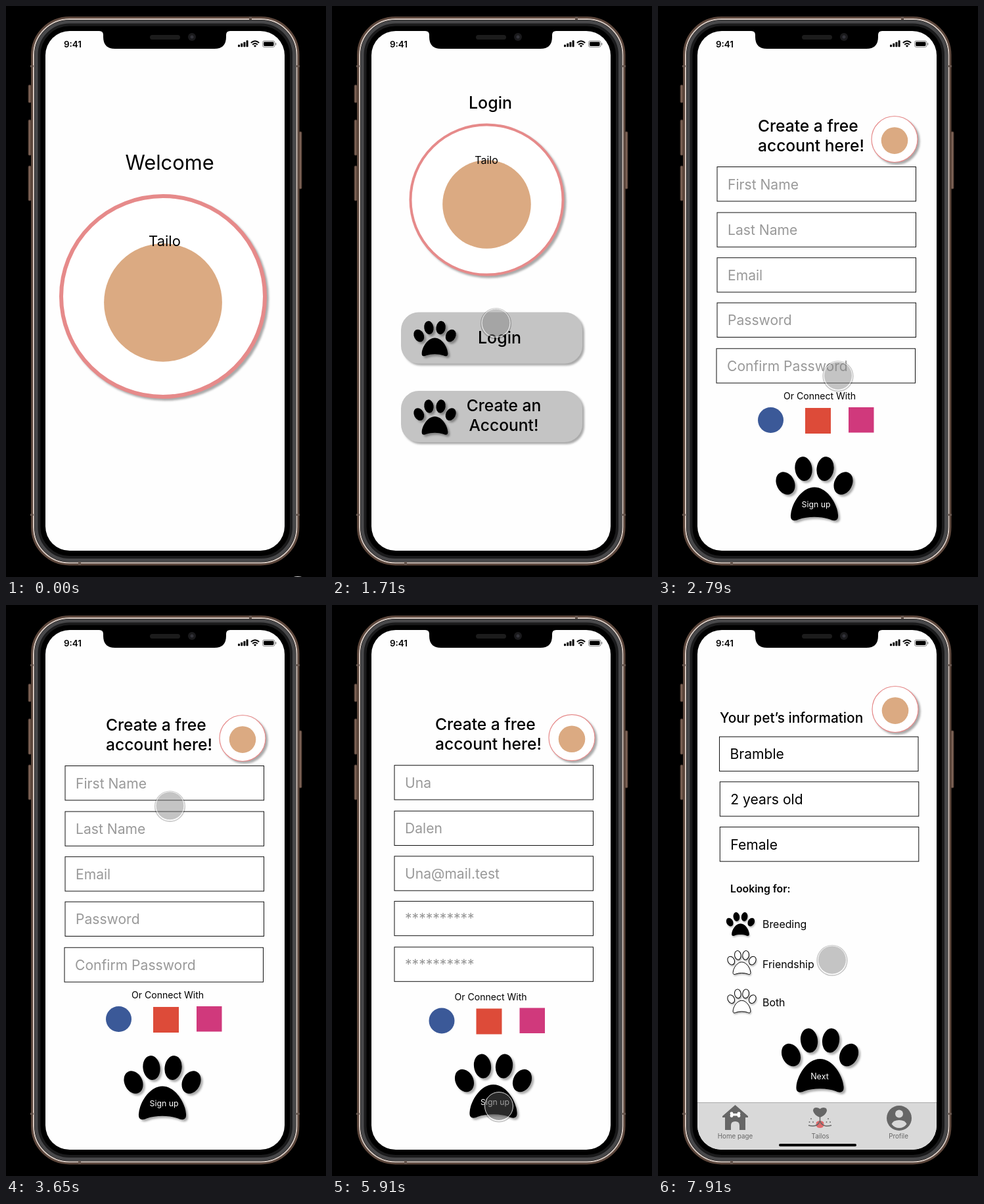
An HTML page for the animation above (7990 ms loop, 487 by 868 pixels).

```html
<!DOCTYPE html>
<html lang="en">
<head>
<meta charset="utf-8">
<title>Pet app prototype</title>
<style>
  html, body { margin: 0; width: 100%; height: 100%; overflow: hidden; background: #000; }
  svg { display: block; width: 100%; height: 100%; font-family: Inter, sans-serif; }
  .shadow { filter: drop-shadow(3.5px 3.5px 1.8px #0005); }
  .soft { filter: drop-shadow(1px 2px 1px #0004); }
</style>
</head>
<body>
<svg id="stage" viewBox="0 0 487 868"></svg>
<script>
const LOOP = 7990;
const stage = document.getElementById('stage');

const text = (x, y, size, str, opts = '') =>
  `<text x="${x}" y="${y}" font-size="${size}" ${opts}>${str}</text>`;
const rect = (x, y, w, h, opts = '') =>
  `<rect x="${x}" y="${y}" width="${w}" height="${h}" ${opts}/>`;
const shift = (x, y, content) => `<g transform="translate(${x} ${y})">${content}</g>`;
const medium = 'font-weight="500"';
const middle = 'text-anchor="middle"';

function paw(x, y, scale, opts = 'class="shadow"') {
  const toe = (cx, cy, rx, ry, angle) =>
    `<ellipse rx="${rx}" ry="${ry}" transform="translate(${cx} ${cy}) rotate(${angle})"/>`;
  return `<g ${opts}><g transform="translate(${x} ${y}) scale(${scale})">
    ${toe(-44, -8, 13.5, 18, -27)}${toe(-16.5, -30, 13, 18.5, -8)}
    ${toe(16.5, -30, 13, 18.5, 8)}${toe(44, -8, 13.5, 18, 27)}
    <path d="M0-2C20-2 35 24 36 40C37 50 30 50 24 47C10 42-10 42-24 47C-30 50-37 50-36 40C-35 24-20-2 0-2Z"/>
  </g></g>`;
}

function badge(x, y, rx, ry, line) {
  return `<ellipse class="shadow" cx="${x}" cy="${y}" rx="${rx}" ry="${ry}" fill="#fff" stroke="#e68a8a" stroke-width="${line}"/>
    <circle cx="${x}" cy="${y + rx * 0.06}" r="${rx * 0.58}" fill="#dbaa82"/>`;
}

const field = (x, y, label, color) =>
  rect(x, y, 302.5, 52.3, 'fill="#fff" stroke="#111"') +
  text(x + 16, y + 34, 21.1, label, `fill="${color}"`);

function welcomePage() {
  return text(249, 249, 30.8, 'Welcome', middle) +
    badge(239, 441.5, 155, 152.5, 6) +
    text(241.5, 365, 22, 'Tailo', middle);
}

function loginPage() {
  const button = y => rect(105, y, 276, 78, 'rx="27" fill="#c4c4c4" class="shadow"') + paw(156.5, y + 40, 0.55);
  const hint = 'fill="#00a0e1" fill-opacity=".17" stroke="#5ac8f0" stroke-opacity=".6"';
  return text(241, 156, 25, 'Login', `${middle} ${medium}`) +
    badge(235.5, 294.5, 116, 114, 4) +
    text(235, 240, 16, 'Tailo', middle) +
    button(465.5) + button(585) +
    text(255, 513, 25, 'Login', `${middle} ${medium}`) +
    text(261.5, 616, 24.6, 'Create an', `${middle} ${medium}`) +
    text(261.5, 646, 24.6, 'Account!', `${middle} ${medium}`) +
    `<g id="hint">${rect(104.5, 586, 275, 76.5, hint)}${rect(187, 594, 149.5, 53, hint)}</g>`;
}

function formPage(labels, body, last, social, pawShift) {
  const fields = labels.map((label, i) =>
    field(90 + (i === 4 ? last : 0), [244.5, 314, 382.7, 451.2, 520.8][i], label, '#999')).join('');
  return shift(...body,
      text(152, 191, 24.6, 'Create a free', medium) +
      text(152, 221, 24.6, 'account here!', medium) +
      badge(360, 202.5, 35, 35, 1.2) + fields) +
    shift(...social,
      text(191, 598, 14.06, 'Or Connect With') +
      '<circle cx="171.5" cy="629.5" r="19.5" fill="#3b5998"/>' +
      rect(224, 611, 39, 39, 'fill="#dd4b39"') +
      rect(290, 610, 38.5, 38.5, 'fill="#d0397c"')) +
    shift(...pawShift,
      paw(238, 733.5, 1) + text(240.5, 762, 12.3, 'Sign up', `${middle} fill="#fff"`));
}

function tabBar() {
  const label = (x, str) => text(x, 809, 9.8, str, `${middle} fill="#666"`);
  const dots = [[230, 779], [227.5, 784], [233, 784], [256, 779], [253.5, 784], [259, 784]]
    .map(([x, y]) => `<circle cx="${x}" cy="${y}" r=".9"/>`).join('');
  return rect(50, 754.5, 390, 80, 'fill="#d9d9d9" stroke="#aaa"') +
    `<g fill="#666">
      <path d="M114.5 758L134 775V777H130V796H121V789Q121 783 114.5 783Q108 783 108 789V796H99V777H95V775Z"/>
      <g fill="#fff"><rect x="109" y="771" width="11" height="3.5"/>
        <circle cx="109" cy="771" r="2.4"/><circle cx="109" cy="774.5" r="2.4"/>
        <circle cx="120" cy="771" r="2.4"/><circle cx="120" cy="774.5" r="2.4"/></g>
      <path d="M238 784Q243.5 780 249 784Q251 793 243.5 793Q236 793 238 784Z" fill="#e0696b"/>
      <path d="M233 767Q233 762 238 762Q241 762 243.5 764Q246 762 249 762Q254 762 254 767Q252 774 243.5 777Q235 774 233 767Z"/>
      <path d="M243.5 776V782M226 789Q240 793 243.5 782Q247 793 261 789" fill="none" stroke="#666" stroke-width="1.5"/>
      ${dots}
      <circle cx="364" cy="778" r="19"/>
      <g fill="#d9d9d9"><circle cx="364" cy="771.5" r="6"/><path d="M352.5 787Q355 781 364 781Q373 781 375.5 787Q371 793 364 793Q357 793 352.5 787Z"/></g>
    </g>` +
    label(114.5, 'Home page') + label(244, 'Tailos') + label(363, 'Profile') +
    rect(181, 817, 118, 4, 'rx="2"');
}

function petPage(labels, color, chosen, badgeX, titleY, pawX, tabShift) {
  const options = [['Breeding', 125.5, 485, 491], ['Friendship', 127.5, 543.5, 551.5], ['Both', 127.5, 602, 610]];
  const outline = 'class="soft" fill="#fff" stroke="#000" stroke-width="2.7"';
  return text(94, titleY, 20.8, 'Your pet’s information', medium) +
    badge(badgeX, 158.5, 35, 35, 1.2) +
    labels.map((label, i) => field(i ? 94.3 : 93.5, [200.3, 268.8, 337.5][i], label, color)).join('') +
    text(110, 437, 15.8, 'Looking for:', 'font-weight="600"') +
    options.map(([name, x, y, base], i) =>
      paw(x, y, 0.37, i === chosen ? 'class="soft"' : outline) + text(159, base, 15.9, name)).join('') +
    paw(pawX, 692, 1) + text(pawX - 0.5, 721, 12.5, 'Next', `${middle} fill="#fff"`) +
    shift(...tabShift, tabBar());
}

function phoneBody() {
  const ring = (inset, color, width) =>
    rect(38.5 + inset, 16.5 + inset, 407.5 - 2 * inset, 833.5 - 2 * inset,
      `rx="${58 - inset}" fill="#000" stroke="${color}" stroke-width="${width}"`);
  const side = (x, y, h) => rect(x, y, 4, h, 'rx="1.5" fill="#7d6255" stroke="#3d2e27"');
  return side(34, 120, 27) + side(34, 173, 54) + side(34, 243, 53) + side(446, 191, 87) +
    ring(1, '#5d473c', 3) + ring(3.5, '#d6c8c0', 2) + ring(8, '#48484a', 6) + ring(12, '#1b1b1c', 4) +
    [[370, 16, 4, 5], [110, 845, 4, 5], [37, 90, 5, 3], [442, 90, 5, 3], [37, 772, 5, 3], [442, 772, 5, 3]]
      .map(band => rect(...band, 'fill="#66564e"')).join('');
}

function statusBar() {
  const bars = [3.5, 5.5, 7.5, 10].map((h, i) => rect(353 + i * 4.2, 62.3 - h, 3, h, 'rx=".8"')).join('');
  return `<path d="M142 37V38Q148 38 148 44V47Q148 65 166 65H317Q335 65 335 47V44Q335 38 341 38V37Z"/>` +
    rect(219, 44, 46, 7, 'rx="3.5" fill="#1c1c1c"') +
    '<circle cx="283" cy="47" r="6" fill="#1a1a1c"/><circle cx="283" cy="47" r="2.5" fill="#33333a"/>' +
    text(101.5, 62.5, 13.4, '9:41', `${middle} font-weight="600"`) + bars +
    `<path d="M372.8 56Q379 50.3 385.2 56M375.2 58.8Q379 55.3 382.8 58.8" fill="none" stroke="#000" stroke-width="1.9"/>
     <path d="M376.8 60.4Q379 58.6 381.2 60.4L379 62.8Z"/>` +
    rect(390.5, 53, 18.5, 9.5, 'rx="2.6" fill="none" stroke="#888"') +
    rect(392, 54.5, 15.5, 6.5, 'rx="1.4"') + rect(410, 56, 1.3, 3.6, 'rx=".6" fill="#888"');
}

// [content, dissolve start, dissolve length]
const pages = [
  [welcomePage(), -1, 1],
  [loginPage(), 620, 420],
  [formPage(['First Name', 'Last Name', 'Email', 'Password', 'Confirm Password'], [0, 0], -1, [0, 0], [0, 0]), 2480, 310],
  [formPage(['Una', 'Dalen', 'Una@mail.test', '**********', '**********'], [5, -0.8], 0, [-4.5, 2.5], [7.5, -2.5]), 3770, 350],
  [petPage(['Pet Name', 'Age', 'Gender'], '#999', -1, 360, 178, 241.5, [0, 0]), 5960, 1],
  [petPage(['Bramble', '2 years old', 'Female'], '#000', 0, 361, 179, 246.5, [3, 2]), 7100, 190],
];

// [start, end, x, y, sideways bend]
const moves = [
  [30, 470, 248, 477, 0],
  [1590, 2420, 274, 562, 0],
  [3300, 3750, 246, 269, 0],
  [4630, 5470, 278, 757, 0],
  [5500, 5760, 254, 762, 0],
  [6250, 7070, 247, 225, 66],
  [7470, 7920, 265, 540, 0],
];
const presses = [[600, 1080], [5720, 6140]];

stage.innerHTML = `<clipPath id="screen">${rect(60, 38, 364, 790, 'rx="37"')}</clipPath>` +
  phoneBody() +
  `<g clip-path="url(#screen)">${pages.map(([content]) =>
    `<g class="page">${rect(59, 37, 366, 792, 'fill="#fefefe"')}${content}</g>`).join('')}</g>` +
  statusBar() +
  `<g id="cursor"><circle r="22.8" cy=".8" fill="none" stroke="#000" stroke-opacity=".22" stroke-width="1.6"/>
    <circle id="dot" r="21.5" stroke="#fff" stroke-opacity=".85"/></g>`;

const pageNodes = stage.querySelectorAll('.page');
const [hint, cursor, dot] = ['hint', 'cursor', 'dot'].map(id => document.getElementById(id));

function smooth(k) {
  k = Math.min(1, Math.max(0, k));
  return k * k * (3 - 2 * k);
}

function draw(t) {
  pages.forEach(([, start, length], i) => {
    const alpha = smooth((t - start) / length);
    pageNodes[i].setAttribute('opacity', alpha);
    const covered = pages[i + 1] && t >= pages[i + 1][1] + pages[i + 1][2];
    pageNodes[i].style.display = alpha && !covered ? '' : 'none';
  });
  hint.style.display = t >= 2330 ? '' : 'none';

  let x = 444, y = 889;
  for (const [start, end, toX, toY, bend] of moves) {
    const k = smooth((t - start) / (end - start));
    x += (toX - x) * k + bend * 4 * k * (1 - k);
    y += (toY - y) * k;
  }
  cursor.setAttribute('transform', `translate(${x} ${y})`);
  const pressed = presses.some(([from, to]) => t >= from && t < to);
  dot.setAttribute('fill', pressed ? 'rgba(75,75,75,.55)' : 'rgba(130,130,130,.47)');
}

const begin = performance.now();
function tick() {
  draw((performance.now() - begin) % LOOP);
  requestAnimationFrame(tick);
}
tick();
</script>
</body>
</html>
```
